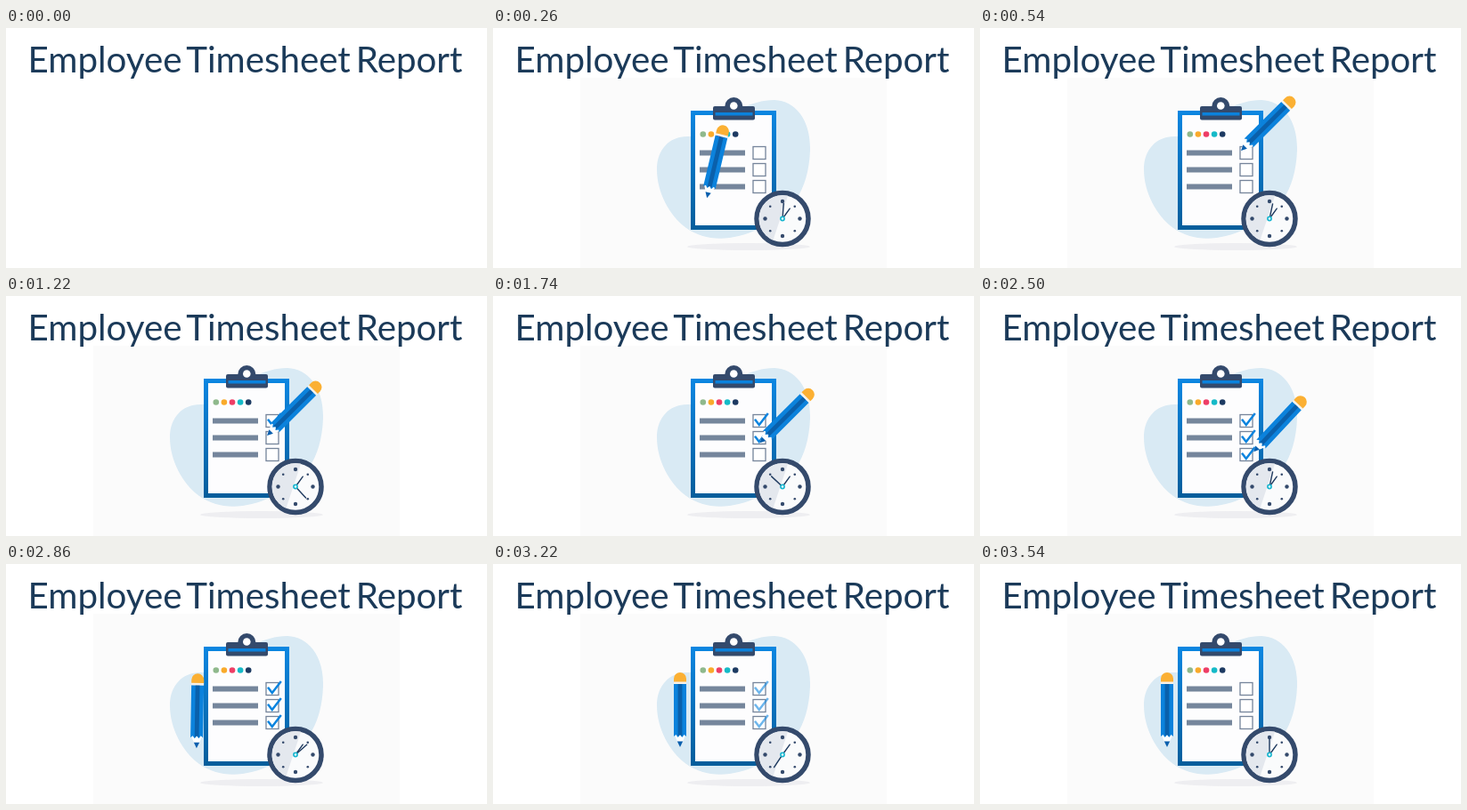
Animation of 540 by 270 pixels, one loop 3.62 s. Source, as an HTML page:

```html
<!DOCTYPE html>
<html lang="en">
<head>
<meta charset="utf-8">
<title>Employee Timesheet Report</title>
<style>
html, body { margin: 0; width: 100%; height: 100%; overflow: hidden; background: #fff; }
svg { display: block; width: 540px; height: 270px; }
text { font: 40.3px Lato, sans-serif; word-spacing: -4.4px; fill: #1b3a59; }
</style>
</head>
<body>
<svg viewBox="0 0 540 270">
  <defs>
    <linearGradient id="frame" x1="0" y1="0" x2="0" y2="1">
      <stop offset="0" stop-color="#0b86e0"/>
      <stop offset="1" stop-color="#045e9c"/>
    </linearGradient>
    <clipPath id="face"><circle cx="325" cy="214.5" r="26.5"/></clipPath>
  </defs>
  <g id="scene">
    <path fill="#fbfbfb" d="M98 56H442V270H98z"/>
    <path fill="#d9eaf4" d="M184 159C184 136 199 121 220 122C250 121 268 82 316 81C340 82 357 104 356 138C354 184 335 209 300 225C268 241 238 240 217 225C198 211 184 185 184 159z"/>
    <ellipse cx="287" cy="246" rx="69" ry="4" fill="#eeeef1"/>
    <rect x="224.5" y="95.5" width="91" height="129" fill="#fdfdfe" stroke="url(#frame)" stroke-width="5"/>
    <g fill="#344a6c">
      <rect x="247" y="88" width="47" height="15.5" rx="2"/>
      <circle cx="270.3" cy="88" r="10"/>
    </g>
    <rect x="249.5" y="95" width="42" height="3.5" fill="#0b82dc"/>
    <circle cx="270.3" cy="87.5" r="4.3" fill="#fff"/>
    <g id="dots"></g>
    <g id="rows"></g>
    <g id="clock">
      <circle cx="325" cy="214.5" r="29" fill="#fafbfc" stroke="#344a6c" stroke-width="5.5"/>
      <path d="M290 180H334L312 246H290z" fill="#e4e8ee" clip-path="url(#face)"/>
    </g>
    <g stroke="#1f3a5f" stroke-width="1.4" stroke-linecap="round">
      <path d="M325 214.5v-14" transform="rotate(36 325 214.5)"/>
      <path id="minute" d="M325 214.5v-17"/>
    </g>
    <circle cx="325" cy="214.5" r="2.1" fill="#fff" stroke="#16b5cf" stroke-width="1.6"/>
    <g id="pencil">
      <path fill="#fff" d="M-7 -15L0 0L7 -15z"/>
      <path fill="#0a5fae" d="M-3.2 -6.5H3.2L0 0z"/>
      <path fill="#0b82dc" d="M-7 -71H7V-12L4.6 -14L2.3 -11L0 -14L-2.3 -11L-4.6 -14L-7 -12z"/>
      <path fill="#0a60ab" d="M-2.4 -71H2.4V-12L0 -14L-2.4 -12z"/>
      <path fill="#f6f1ea" d="M-7 -74H7V-71H-7z"/>
      <path fill="#fbb033" d="M-7 -73.5V-77A7 7 0 0 1 7 -77V-73.5z"/>
    </g>
  </g>
  <text x="24.6" y="50">Employee Timesheet Report</text>
</svg>
<script>
const LOOP = 3620, START = 100, FIRST = 540, PERIOD = 680;
const VERTEX = 120, STROKE = 330;
const LEAVE = 2440, HOME = 2905;
const rest = [210, 206];
const $ = id => document.getElementById(id);

function add(parent, tag, attrs) {
  const el = document.createElementNS("http://www.w3.org/2000/svg", tag);
  for (const name in attrs) el.setAttribute(name, attrs[name]);
  return $(parent).appendChild(el);
}

["#8fb98c", "#f9aa2b", "#ee3e66", "#15bac8", "#1d3a62"].forEach((fill, i) =>
  add("dots", "circle", { cx: 235.8 + 9.1 * i, cy: 119.5, r: 3.3, fill }));

const ticks = [0, 19, 38].map(dy => {
  add("rows", "rect", { x: 232, y: 137.5 + dy, width: 51, height: 6, fill: "#75869c" });
  add("rows", "rect", { x: 292, y: 133.5 + dy, width: 14, height: 14, fill: "#fff", stroke: "#75849a", "stroke-width": 1.3 });
  return add("rows", "path", {
    d: `M294 ${138.8 + dy}l4.8 6.2l10 -13`, pathLength: 1, fill: "none",
    stroke: "#0b84df", "stroke-width": 2.5, "stroke-dasharray": "1 2"
  });
});

for (let i = 0; i < 8; i++) {
  const a = i * Math.PI / 4;
  add("clock", "circle", {
    cx: 325 + 19.5 * Math.sin(a), cy: 214.5 - 19.5 * Math.cos(a),
    r: i % 2 ? 1.3 : 2.2, fill: "#344a6c"
  });
}

const clamp = x => Math.min(1, Math.max(0, x));
const span = (t, from, to) => clamp((t - from) / (to - from));
const ease = p => (1 - Math.cos(Math.PI * p)) / 2;
const mix = (a, b, p) => a.map((v, i) => v + (b[i] - v) * p);
const curve = (a, b, c, p) => mix(mix(a, b, p), mix(b, c, p), p);

function keyed(t, keys) {
  const i = Math.max(1, keys.findIndex(k => k[0] >= t));
  const [a, b] = [keys[i - 1], keys[i]];
  return a[1] + (b[1] - a[1]) * span(t, a[0], b[0]);
}

// Returns the position of the pencil's tip and its tilt in degrees
function pencilPose(t) {
  if (t < FIRST) {
    const p = ease(span(t, START, FIRST));
    return [curve(rest, [265, 185], [293, 138], p), 45 * p];
  }
  if (t >= LEAVE) {
    const p = ease(span(t, LEAVE, HOME));
    return [curve([308, 170], [300, 236], rest, p), 45 * (1 - p)];
  }
  const n = Math.min(2, Math.floor((t - FIRST) / PERIOD));
  const u = t - FIRST - n * PERIOD, y = 138 + 19 * n;
  const from = [293, y], low = [298, y + 6], high = [308, y - 6];
  if (u < VERTEX) return [mix(from, low, u / VERTEX), 45];
  if (u < STROKE || n === 2) return [mix(low, high, span(u, VERTEX, STROKE)), 45];
  return [mix(high, [293, y + 19], ease(span(u, STROKE, PERIOD))), 45];
}

const minuteKeys = [[100, 0], [540, 12], [1220, 137], [1740, 313], [2200, 360],
  [2500, 372], [2860, 408], [3540, 720], [LOOP, 720]];

function draw(t) {
  $("scene").style.display = t < START ? "none" : "";
  const [[x, y], angle] = pencilPose(t);
  $("pencil").setAttribute("transform", `translate(${x} ${y}) rotate(${angle})`);
  $("minute").setAttribute("transform", `rotate(${keyed(t, minuteKeys)} 325 214.5)`);
  ticks.forEach((tick, i) => {
    const u = t - FIRST - i * PERIOD;
    const drawn = 0.32 * span(u, 0, VERTEX) + 0.68 * span(u, VERTEX, STROKE);
    tick.setAttribute("stroke-dashoffset", 1 - drawn);
    tick.setAttribute("opacity", drawn > 0 ? 1 - span(t, 3100, 3400) : 0);
  });
}

const begin = performance.now();
function play() {
  draw((performance.now() - begin) % LOOP);
  requestAnimationFrame(play);
}
play();
</script>
</body>
</html>
```
